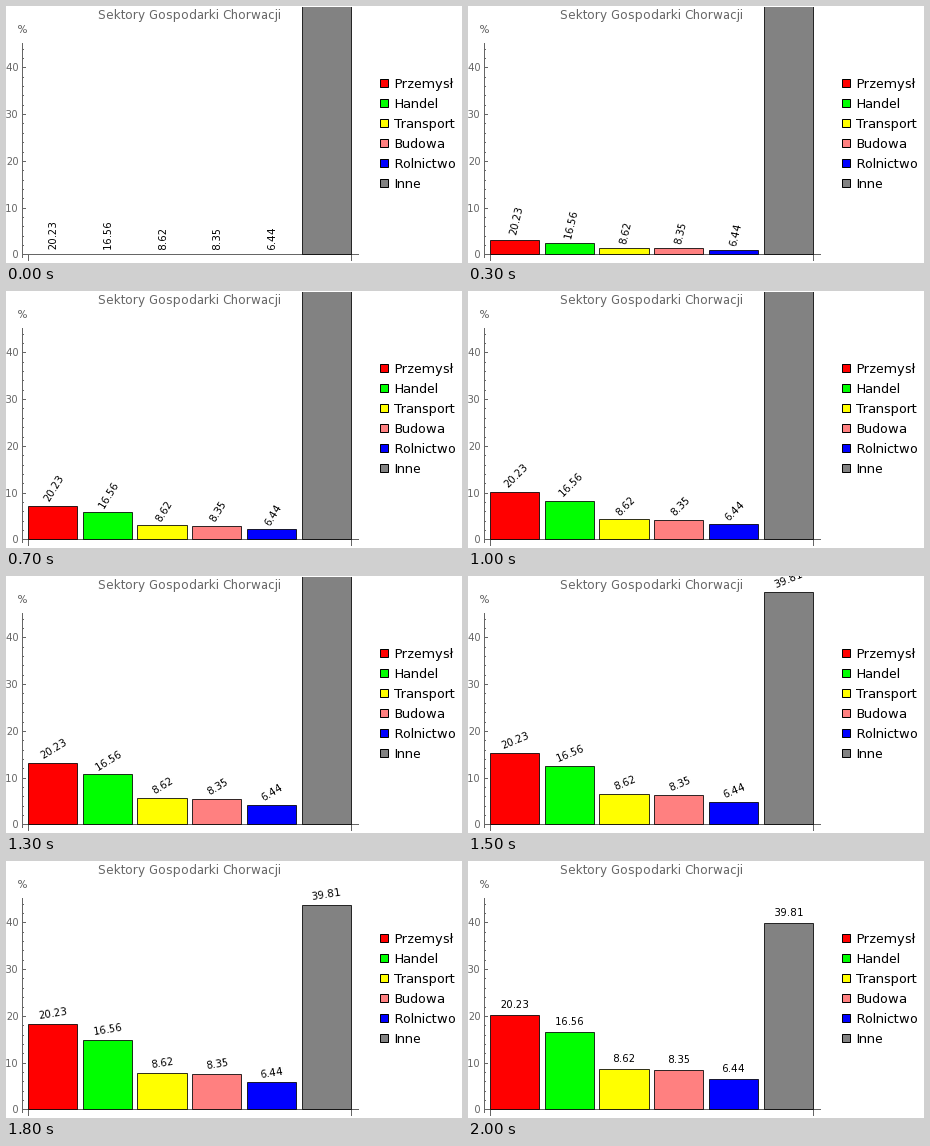
A matplotlib script that plays this animation: 456 by 257 pixels, repeating every 2.1 s.

```python
import numpy as np
import matplotlib.pyplot as plt
from matplotlib.animation import FuncAnimation
from matplotlib.patches import Rectangle

W, H, DPI = 456, 257, 72          # at 72 dpi one point is one pixel
FRAMES, LOOP_MS = 21, 2100
SECTORS = [
    ("Przemysł", 20.23, "#ff0000"),
    ("Handel", 16.56, "#00ff00"),
    ("Transport", 8.62, "#ffff00"),
    ("Budowa", 8.35, "#ff8080"),
    ("Rolnictwo", 6.44, "#0000ff"),
    ("Inne", 39.81, "#828282"),
]
GREY = "#666666"
BASE, UNIT = 248.75, 4.67         # zero line and pixels per percent
LEFT, BAR, STEP = 22.5, 49.2, 54.74

plt.rcParams.update({"font.family": "DejaVu Sans", "toolbar": "None",
                     "text.hinting_factor": 1})
fig = plt.figure(figsize=(W / DPI, H / DPI), dpi=DPI, facecolor="white")
ax = fig.add_axes([0, 0, 1, 1])
ax.set(xlim=(0, W), ylim=(H, 0))
ax.axis("off")


def mid(v):
    """Centre of the pixel that holds v."""
    return np.floor(v) + 0.5


def line(x0, y0, x1, y1):
    ax.plot([x0, x1], [y0, y1], color=GREY, lw=1, solid_capstyle="butt",
            snap=False, zorder=1)


def box(x, y, w, h, color, edge="black"):
    return ax.add_patch(Rectangle((x, y), w, h, fc=color, ec=edge, lw=1,
                                  joinstyle="miter", snap=False, zorder=2))


def text(x, y, s, size, color="black", ha="center", va="baseline", **kw):
    return ax.text(x, y, s, fontsize=size, color=color, ha=ha, va=va, **kw)


def draw_axes():
    line(16.5, 37, 16.5, 252)
    line(16, 248.5, 353, 248.5)
    for x in (22.5, 345.5):
        line(x, 248, x, 255)
    for v in range(0, 46, 2):
        y = mid(BASE - v * UNIT)
        line(16, y, 20 if v % 10 == 0 else 18, y)
        if v % 10 == 0:
            text(13.2, y + 3.5, str(v), 10, GREY, ha="right")
    text(16, 27, "%", 10, GREY)
    text(183.7, 13, "Sektory Gospodarki Chorwacji", 12, GREY)


def draw_legend():
    for i, (name, _, color) in enumerate(SECTORS):
        y = 73.5 + 20 * i
        box(374.5, y, 8, 8, color)
        text(388, y + 8.5, name, 13, ha="left")


draw_axes()
draw_legend()

clip = Rectangle((0, 1), W, H, transform=ax.transData)
bars, labels = [], []
for i, (_, value, color) in enumerate(SECTORS):
    x = LEFT + i * STEP
    bar = box(mid(x), BASE, mid(x + BAR) - mid(x), 0, color, (0, 0, 0, 0.8))
    label = text(x + BAR / 2, BASE, f"{value:.2f}", 10, va="center",
                 rotation_mode="anchor", zorder=3)
    for part in (bar, label):
        part.set_clip_path(clip)
    bars.append(bar)
    labels.append(label)


def update(n):
    t = n / (FRAMES - 1)
    angle = 90 * (1 - t)
    sin, cos = np.sin(np.radians(angle)), np.cos(np.radians(angle))
    drop = 1.7 if 0 < t < 1 else 0      # slanted text sits a little lower
    for i, ((name, value, _), bar, label) in enumerate(zip(SECTORS, bars, labels)):
        # the last bar shrinks from double height while the others grow
        height = value * UNIT * (2 - t if name == "Inne" else t)
        top = mid(BASE - height)
        bar.set_y(top)
        bar.set_height(mid(BASE) - top)
        bar.set_visible(height > 0)
        half = 14.3 if value >= 10 else 11.1
        lift = 10.6 + (half - 4.3) * sin
        center = LEFT + i * STEP + BAR / 2
        label.set_position((center + drop * sin,
                            BASE - height - lift + drop * cos))
        label.set_rotation(angle)
    return bars + labels


anim = FuncAnimation(fig, update, frames=FRAMES, interval=LOOP_MS / FRAMES,
                     repeat=True, repeat_delay=0)
plt.show()
```
